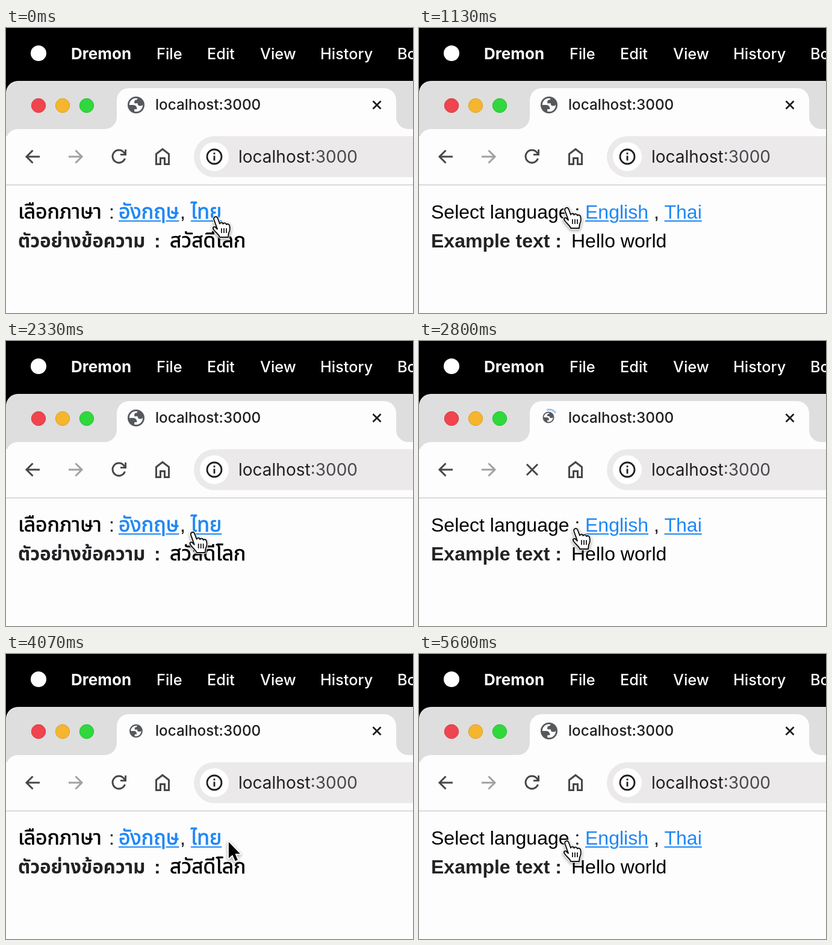
These frames come from a looping animation (676 by 474 pixels, 5.67 s). An HTML page with a canvas:

```html
<!DOCTYPE html>
<html lang="en">
<head>
<meta charset="utf-8">
<title>Language switch</title>
<style>
html, body { margin: 0; width: 100%; height: 100%; overflow: hidden; background: #fdfdfd; }
canvas { display: block; }
</style>
</head>
<body>
<canvas id="stage" width="676" height="474"></canvas>
<script>
const ctx = document.getElementById('stage').getContext('2d');
const LOOP = 5670, STEP = 200 / 3;
const PAPER = '#fdfdfd', STRIP = '#dedede', INK = '#1f1f22', LINK = '#1f87f5';
const UI = 'Inter, "Open Sans", sans-serif';
const LATIN = '"Liberation Sans", Arial, sans-serif';
const THAI = '"Noto Sans Thai Looped", "Noto Sans Thai", "Noto Sans", "Liberation Sans", sans-serif';

// Page switches; each one shows the other language.
const SWITCHES = [800, 1870, 2800, 3870, 4740];

// Pointer moves: start, end, from, to, sag of the path.
const MOVES = [
  [0, 530, [350, 315], [247, 300], 21],
  [1270, 1720, [247, 300], [431, 312], 18],
  [2000, 2520, [431, 312], [262, 313], 8],
  [3070, 3440, [262, 313], [415, 313], 13],
  [3900, 4390, [415, 313], [247, 312], 0]
];

const globe = new Path2D('M480-80a400 400 0 1 0 0-800a400 400 0 1 0 0 800zm0-80q134 0 227-93t93-227' +
  'q0-7-.5-14.5T799-507q-5 29-27 48t-52 19h-80q-33 0-56.5-23.5T560-520v-40H400v-80q0-33 23.5-56.5T480-720' +
  'h40q0-23 12.5-40.5T563-789q-20-5-40.5-8t-42.5-3q-134 0-227 93t-93 227h200q66 0 113 47t47 113v40H400v110' +
  'q20 5 39.5 7.5T480-160z');
const hand = new Path2D('M-4.5 4C-6-1-.5-3 1.5 1L5 10.5C6 7.5 10 8 10.5 10.8C12 8.5 15.5 9 16 11.8' +
  'C18 10 21 11 21.5 14.5C22.5 19 22 22 20 26L19 33H5C4 29-1 26-5 20.5C-8 16-4 14-1.5 17L1 19.5Z');
const arrow = new Path2D('M0 0V27L6.3 21.2L10.8 31.5L15 29.7L10.6 19.6H19Z');

function text(str, x, y, font, color, weight = 0) {
  ctx.font = font;
  ctx.fillStyle = color;
  ctx.fillText(str, x, y);
  if (!weight) return;
  ctx.strokeStyle = color;
  ctx.lineWidth = weight;
  ctx.strokeText(str, x, y);
}

function link(str, x, y, font, weight) {
  ctx.font = font;
  ctx.fillStyle = LINK;
  ctx.fillRect(x, y + 3, ctx.measureText(str).width, 2);
  ctx.strokeStyle = PAPER;
  ctx.lineWidth = 5;
  ctx.strokeText(str, x, y);
  text(str, x, y, font, LINK, weight);
}

function disc(x, y, r, fill, edge) {
  ctx.beginPath();
  ctx.arc(x, y, r, 0, 7);
  ctx.fillStyle = fill;
  ctx.fill();
  if (edge) stroke(edge, 1);
}

function stroke(color, width) {
  ctx.strokeStyle = color;
  ctx.lineWidth = width;
  ctx.stroke();
}

function line(d, color, width) {
  ctx.strokeStyle = color;
  ctx.lineWidth = width;
  ctx.stroke(new Path2D(d));
}

function fill(d, color) {
  ctx.fillStyle = color;
  ctx.fill(new Path2D(d));
}

function menuBar() {
  ctx.fillStyle = '#000';
  ctx.fillRect(0, 0, 676, 110);
  disc(54, 42, 13, '#fff');
  text('Dremon', 108, 52, `700 26px ${UI}`, '#fff');
  [['File', 250], ['Edit', 334], ['View', 422], ['History', 522], ['Bookmarks', 650]]
    .forEach(([name, x]) => text(name, x, 52, `500 25.3px ${UI}`, '#fff'));
}

function browser(loading) {
  fill('M0 108A20 20 0 0 1 20 88H676V180H0Z', STRIP);
  line('M1 107A19 19 0 0 1 20 89H676', '#e8e8e8', 1);
  fill('M0 188A20 20 0 0 1 20 168H164A20 20 0 0 0 184 148V120A20 20 0 0 1 204 100H628' +
    'A20 20 0 0 1 648 120V148A20 20 0 0 0 668 168H676V474H0Z', PAPER);
  disc(54, 129, 11.7, '#f0444e', '#d63a43');
  disc(94, 129, 11.7, '#f5b52e', '#dba028');
  disc(134, 129, 11.7, '#2fd83c', '#27bd33');
  text('localhost:3000', 248, 136, `500 24.3px ${UI}`, INK);
  line('M609.5 121.5L622.5 134.5M622.5 121.5L609.5 134.5', '#1c1c1e', 2.8);

  line('M56 214H34M44.5 203.5L34 214L44.5 224.5', '#454749', 3);
  line('M104 214H126M115.5 203.5L126 214L115.5 224.5', '#a0a1a2', 3);
  if (loading) {
    line('M179 205L197 223M197 205L179 223', '#454749', 3);
  } else {
    line('M197.5 217A10.5 10.5 0 1 1 195.6 206.8L198 209.5', '#454749', 3);
    fill('M200 202V212H190V209.2H197.2V202Z', '#454749');
  }
  line('M249.5 226.5V209.5L260 201.5L270.5 209.5V226.5H263.5V216.5H256.5V226.5Z', '#454749', 3);

  fill('M676 180H346A34 34 0 0 0 346 248H676Z', '#ebe9ea');
  disc(346, 214, 24, '#fff');
  ctx.beginPath();
  ctx.arc(346, 214, 12, 0, 7);
  stroke(INK, 2.8);
  ctx.fillStyle = INK;
  ctx.fillRect(344.6, 212.5, 2.8, 8);
  ctx.fillRect(344.6, 207.3, 2.8, 2.9);
  text('localhost', 386, 224, `400 28px ${UI}`, INK);
  text(':3000', 386 + ctx.measureText('localhost').width, 224, ctx.font, '#48484c');
  ctx.fillStyle = '#dadada';
  ctx.fillRect(0, 260, 676, 2);
}

function tabIcon(since) {
  const spinning = since >= -70 && since < 130;
  const grow = Math.min(1, Math.max(0, (since - 150) / 150));
  const r = spinning ? 9.5 : since < 0 ? 14 : 9.5 + 4.5 * grow;
  ctx.save();
  ctx.translate(216 - (spinning ? 1 : 0), 128 - (spinning ? 1 : 0));
  ctx.scale(r / 400, r / 400);
  ctx.translate(-480, 480);
  ctx.fillStyle = '#55585c';
  ctx.fill(globe, 'evenodd');
  ctx.restore();
  if (spinning) {
    const turn = since * 0.006;
    ctx.beginPath();
    ctx.arc(216, 128, 14, turn - 1.85, turn - 0.65);
    stroke('#a0c0f0', 3);
  }
}

function englishPage() {
  const plain = `32px ${LATIN}`;
  text('Select language :', 20, 317, plain, '#000');
  link('English', 276, 317, plain);
  text(',', 390, 317, plain, '#000');
  link('Thai', 407.5, 317, plain);
  text('Example text :', 20, 365, `bold ${plain}`, '#222225');
  text('Hello world', 253, 365, plain, '#000');
}

function thaiPage() {
  const plain = `500 34px ${THAI}`;
  text('เลือกภาษา', 20, 317, plain, '#000', 0.6);
  text(':', 171, 317, `32px ${LATIN}`, '#000');
  link('อังกฤษ', 187, 317, plain, 0.8);
  text(',', 289, 317, `32px ${LATIN}`, '#000');
  link('ไทย', 307, 317, plain, 0.8);
  text('ตัวอย่างข้อความ', 20, 365, `bold 31px ${THAI}`, '#222225');
  text(':', 246, 365, `bold 32px ${LATIN}`, '#222225');
  text('สวัสดีโลก', 272, 365, plain, '#000', 0.6);
}

function pointer(t) {
  const [start, end, a, b, sag] = MOVES.filter(m => m[0] <= t).pop();
  const k = Math.min(1, (t - start) / (end - start));
  const e = k * k * (3 - 2 * k);
  return {
    x: a[0] + (b[0] - a[0]) * e,
    y: a[1] + (b[1] - a[1]) * e + sag * Math.sin(Math.PI * e),
    moving: k > 0 && k < 1
  };
}

function overLink(x, y, english) {
  const spans = english ? [[276, 381], [407, 470]] : [[187, 281], [307, 360]];
  return y < 326 && spans.some(([l, r]) => x >= l && x <= r);
}

function drawPointer(p, english) {
  const arrowShape = p.moving && !overLink(p.x, p.y, english);
  const shape = arrowShape ? arrow : hand;
  ctx.save();
  ctx.translate(p.x, p.y);
  ctx.shadowColor = 'rgba(0,0,0,.4)';
  ctx.shadowBlur = 5;
  ctx.shadowOffsetY = 2;
  ctx.strokeStyle = '#fff';
  ctx.lineWidth = 4;
  ctx.stroke(shape);
  ctx.shadowColor = 'transparent';
  ctx.fillStyle = arrowShape ? '#000' : '#fff';
  ctx.fill(shape);
  if (!arrowShape) {
    ctx.strokeStyle = '#111';
    ctx.lineWidth = 2;
    ctx.stroke(shape);
    line('M8 18V26M12 18V26M16 18V26', '#111', 1.7);
  }
  ctx.restore();
}

function draw(now) {
  const t = Math.floor((now % LOOP + 4) / STEP) * STEP;
  const english = SWITCHES.filter(s => s <= t + 4).length % 2 === 1;
  const near = SWITCHES.filter(s => s - 70 <= t + 4).pop();
  const since = near === undefined ? 1e4 : t - near;
  ctx.lineJoin = 'miter';
  menuBar();
  browser(since < 130);
  tabIcon(since);
  ctx.lineJoin = 'round';
  english ? englishPage() : thaiPage();
  drawPointer(pointer(t), english);
}

const t0 = performance.now();
(function tick() {
  draw(performance.now() - t0);
  requestAnimationFrame(tick);
})();
</script>
</body>
</html>
```
